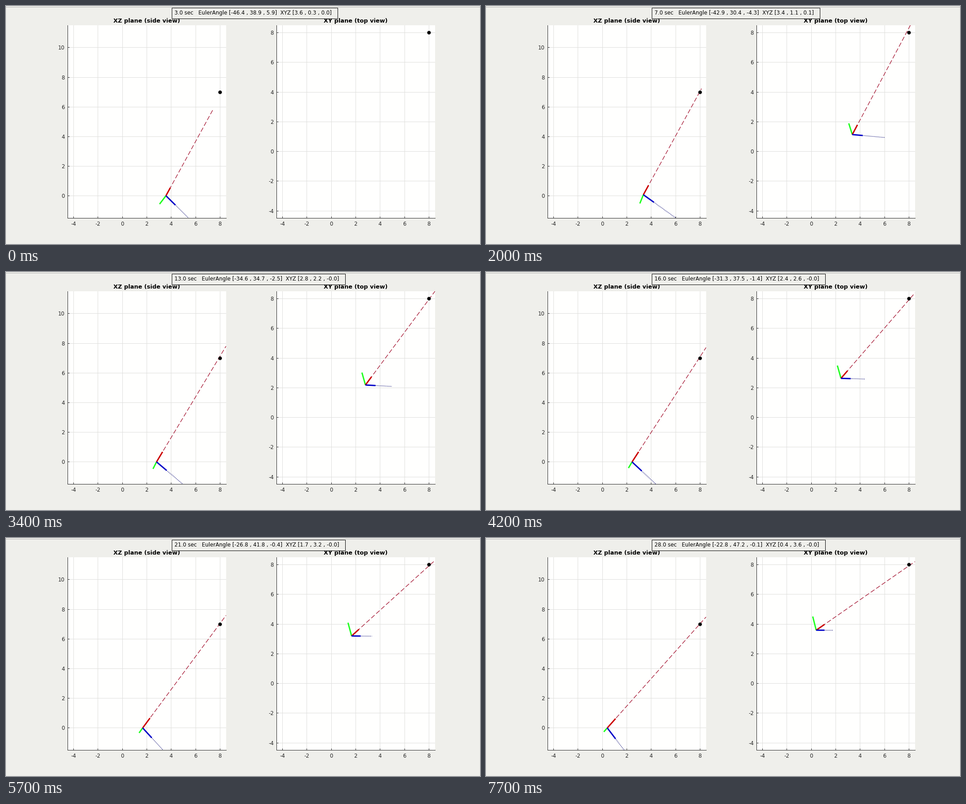
Animation of 1055 by 531 pixels, one loop 8 s. Source, as a matplotlib script:

```python
import numpy as np
import matplotlib.pyplot as plt
from matplotlib.animation import FuncAnimation
from matplotlib.patches import Rectangle
from matplotlib.transforms import Affine2D

W, H, DPI = 1055, 531, 100
PX = 72 / DPI  # points per pixel
STEP_MS, LOOP_MS = 100, 8000
TOP_VIEW_MS = 900
START = 3  # seconds on the clock at the beginning

BACK, PAPER, INK = "#efefeb", "#fffffe", "#262626"
AXIS_COLORS = ("#0000c8", "#20ff20", "#cc0000")  # body x, y, z
RAY_COLOR, NOSE_COLOR = "#a3102d", "#00006e"

LOW = np.array([-4.5, -4.5, -1.5])
HIGH = np.array([8.5, 8.5, 11.5])
TARGET = np.array([8, 8, 7])

plt.rcParams.update({
    "font.family": "DejaVu Sans",
    "font.size": 11.7 * PX,
    "axes.unicode_minus": False,
    "lines.scale_dashes": False,
    "toolbar": "None",
})


def clock(ms):
    """Whole seconds: a long hold, a quick run, then a steady pace."""
    if ms < 1400:
        return START
    if ms < 2800:
        return START + 1 + (ms - 1400) // 200
    return START + 8 + (ms - 2740) // 288


def bump(t, center, width):
    return np.exp(-((t - center) / width) ** 2)


def position(t):
    """Circle at three degrees a second, with a start-up lag and wobble."""
    turn = np.radians(3 * t - 0.5 - 3.9 * np.exp(-(t - START) / 6))
    radius = 3.6 - 0.07 * bump(t, 10, 5)
    return np.array([radius * np.cos(turn), radius * np.sin(turn),
                     0.08 * bump(t, 7, 3) - 0.01])


def settle(s, offset, rate, span):
    """Damped error that swings past zero and fades out."""
    return (offset + rate * s) * np.exp(-(s / span) ** 1.118)


def attitude(t, pos):
    """Roll, pitch and yaw that aim body z at the target, plus the error."""
    s = t - START
    dx, dy, dz = aim = TARGET - pos
    roll = -np.degrees(np.arcsin(dy / np.linalg.norm(aim)))
    pitch = np.degrees(np.arctan2(dx, dz))
    return (roll + 0.4 + settle(s, -3.8, -1.55, 4.125),
            pitch + settle(s, 6.6, -4.07, 3.8),
            settle(s, 5.9, -4.3, 4.125))


def rotation(roll, pitch, yaw):
    (cr, cp, cy), (sr, sp, sy) = [f(np.radians([roll, pitch, yaw]))
                                  for f in (np.cos, np.sin)]
    rz = np.array([[cy, -sy, 0], [sy, cy, 0], [0, 0, 1]])
    ry = np.array([[cp, 0, sp], [0, 1, 0], [-sp, 0, cp]])
    rx = np.array([[1, 0, 0], [0, cr, -sr], [0, sr, cr]])
    return rz @ ry @ rx


def box_exit(pos, direction):
    """Point where a ray leaves the plotted volume."""
    wall = np.where(direction > 0, HIGH, LOW)
    safe = np.where(np.abs(direction) < 1e-9, 1e-9, direction)
    return pos + direction * np.min(np.abs((wall - pos) / safe))


fig = plt.figure(figsize=(W / DPI, H / DPI), dpi=DPI, facecolor=BACK)
pixels = Affine2D().scale(1 / W, -1 / H).translate(0, 1) + fig.transFigure


class View:
    """One projection of the scene onto two of the three space axes."""

    def __init__(self, left, dims, title):
        self.dims = list(dims)
        a, b = dims
        width, top, bottom = 353.2, 42.7, 473.1
        ax = fig.add_axes([left / W, 1 - bottom / H,
                           width / W, (bottom - top) / H], facecolor=PAPER)
        ax.set_xlim(LOW[a], HIGH[a])
        ax.set_ylim(LOW[b], HIGH[b])
        ax.set_xticks(range(-4, 9, 2))
        ax.set_yticks(np.arange(np.ceil(LOW[b] / 2) * 2, HIGH[b], 2).astype(int))
        ax.grid(color="#dededc", lw=1 * PX)
        ax.set_axisbelow(True)
        ax.tick_params(direction="in", length=4 * PX, width=1 * PX,
                       color=INK, labelcolor=INK)
        ax.tick_params(axis="x", pad=7.3 * PX)
        ax.tick_params(axis="y", pad=5.5 * PX)
        for side, spine in ax.spines.items():
            spine.set_visible(side in ("left", "bottom"))
            spine.set(color=INK, linewidth=1 * PX)
        fig.text(left + width / 2, 37, title, transform=pixels, ha="center",
                 va="baseline", weight="bold", size=12.85 * PX, color="black")

        ax.plot(TARGET[a], TARGET[b], "o", color="black", ms=8 * PX, mew=0,
                zorder=3)
        self.ray, = ax.plot([], [], color=RAY_COLOR, lw=1.3 * PX,
                            ls=(0, (10 * PX, 4.8 * PX)))
        self.nose, = ax.plot([], [], color=NOSE_COLOR, lw=1.5 * PX,
                             ls=(0, (1.3 * PX, 1.9 * PX)))
        self.axes = [ax.plot([], [], color=c, lw=3 * PX, zorder=z,
                             solid_capstyle="butt")[0]
                     for c, z in zip(AXIS_COLORS, (6, 4, 5))]
        self.lines = [self.ray, self.nose, *self.axes]

    def segment(self, line, start, end):
        line.set_data(*np.array([start, end])[:, self.dims].T)

    def draw(self, pos, rot, shown=True):
        self.segment(self.ray, pos, box_exit(pos, rot[:, 2]))
        self.segment(self.nose, pos, box_exit(pos, rot[:, 0]))
        for line, direction in zip(self.axes, rot.T):
            self.segment(line, pos, pos + direction)
        for line in self.lines:
            line.set_visible(shown)


side_view = View(136.5, (0, 2), "XZ plane (side view)")
top_view = View(601.5, (0, 1), "XY plane (top view)")

# window edge above the plots
fig.add_artist(Rectangle((0, 2), W, 1, transform=pixels, fc="#b4b4b1", lw=0))

note_box = Rectangle((368.8, 3.8), 370, 24, transform=pixels, fc=BACK,
                     ec="black", lw=1 * PX, zorder=4)
fig.add_artist(note_box)
note = fig.text(374.6, 19, "", transform=pixels, va="baseline",
                color="black", zorder=5)


def listed(values):
    return "[" + " , ".join(f"{v:.1f}" for v in values) + "]"


def update(i):
    ms = i * STEP_MS
    t = clock(ms)
    pos = position(t)
    angles = attitude(t, pos)
    rot = rotation(*angles)
    side_view.draw(pos, rot)
    top_view.draw(pos, rot, ms >= TOP_VIEW_MS)

    note.set_text(f"{t:.1f} sec   EulerAngle {listed(angles)}"
                  f"  XYZ {listed(pos)}")
    right = pixels.inverted().transform(note.get_window_extent().max)[0]
    note_box.set_width(round(right + 13.6) - note_box.get_x())
    return []


anim = FuncAnimation(fig, update, frames=LOOP_MS // STEP_MS,
                     interval=STEP_MS, repeat=True, repeat_delay=0,
                     blit=False)
plt.show()
```
